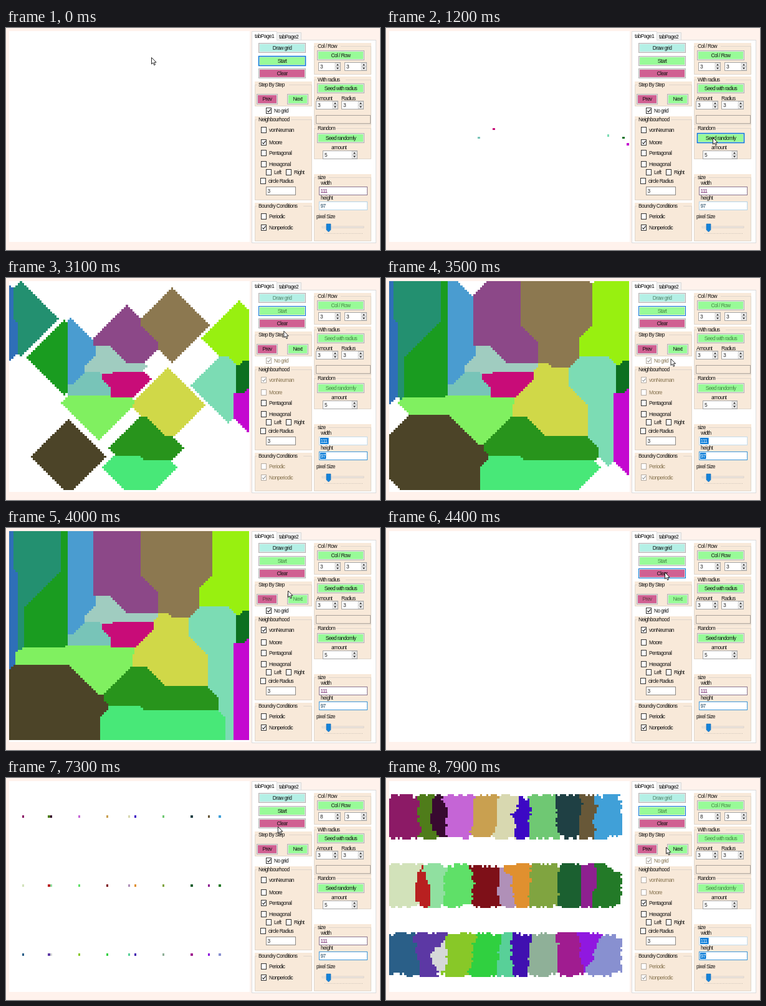
Recreate the animation shown at these times as an HTML page with a canvas. Size 600 px wide and 357 px high, loop 8 s.

```html
<!DOCTYPE html>
<html lang="en">
<head>
<meta charset="utf-8">
<title>Grain growth</title>
<style>
  html, body { margin: 0; width: 100%; height: 100%; overflow: hidden; background: #fff2ec; }
  canvas, svg { position: absolute; left: 0; top: 0; }
  text { font: 8.4px "Liberation Sans", Arial, sans-serif; letter-spacing: -.6px; white-space: pre; }
</style>
</head>
<body>
<canvas id="field" width="600" height="357"></canvas>
<svg id="ui" width="600" height="357" viewBox="0 0 600 357"></svg>
<script>
const LOOP = 8000, TICK = 100;
const COLS = 111, ROWS = 97, CELL = 3.465, ORIGIN = 5;
const ui = document.getElementById('ui');
const pen = document.getElementById('field').getContext('2d');

// --- Seeds -----------------------------------------------------------
const toCell = px => Math.round((px - ORIGIN) / CELL - .5);

const scattered = [
  [1100, 149, 177, '#78c4b8'], [1100, 173, 163, '#c80c78'], [1100, 356, 173, '#7cdcb4'],
  [1100, 380, 177, '#0c7020'], [1100, 388, 187, '#c408d0'],
  [1400, 24, 66, '#239070'], [1400, 7, 73, '#2f6fb8'], [1400, 94, 128, '#1a9c20'],
  [1400, 104, 125, '#4a9cd0'], [1400, 194, 104, '#8c4888'],
  [1700, 266, 76, '#8c7850'], [1700, 374, 97, '#98f010'], [1700, 166, 142, '#a0ccc0'],
  [1700, 149, 201, '#80f060'],
  [2000, 260, 204, '#d0d848'], [2000, 225, 273, '#28941c'], [2000, 100, 287, '#4c4428'],
  [2000, 214, 305, '#48e878']
].map(([time, x, y, color]) => ({ time, col: toCell(x), row: toCell(y), color }));

const palettes = [
  '8c1a66 4f7c1a 380a30 c565d6 c9a050 d8d8b0 3c08c4 6fc873 1f4044 685838 40a0d8',
  'd2e2ba b82020 90e0a0 5fe068 7e1018 b090b8 e0902f 80a440 1b6030 8e2090 237a28',
  '2a5f88 5c38a4 d5d8d8 88c828 30d040 58d098 4010b0 8fb098 a01c90 9018e0 8890d0'
];

// Evenly spaced seeds: one pass with three columns, one with eight.
const evenly = (count, time) => Array.from({ length: count }, (_, i) => {
  const gap = Math.floor(COLS / count);
  return { time, col: i * gap + (gap >> 1) };
});
const lined = palettes.flatMap((palette, band) => {
  const colors = palette.split(' ');
  return [...evenly(3, 5000), ...evenly(8, 6000)]
    .sort((a, b) => a.col - b.col)
    .map((seed, i) => ({ ...seed, row: 16 + 32 * band, color: '#' + colors[i] }));
});

// --- Cellular automaton ----------------------------------------------
let randomState = 7;
const random = () => (randomState = randomState * 16807 % 2147483647) / 2147483647;

const CROSS = [[0, -1], [-1, 0], [1, 0], [0, 1]];
const AROUND = [...CROSS, [-1, -1], [1, -1], [-1, 1], [1, 1]];
const PENTAGONS = CROSS.map(([sx, sy]) =>
  AROUND.filter(([dx, dy]) => sx ? dx !== sx : dy !== sy));
const vonNeuman = () => CROSS;
const pentagonal = () => PENTAGONS[Math.floor(random() * 4)];

function grow(grid, neighbours) {
  return grid.map((value, i) => {
    if (value >= 0) return value;
    const col = i % COLS, row = (i - col) / COLS, votes = {};
    let best = -1;
    for (const [dx, dy] of neighbours()) {
      const x = col + dx, y = row + dy;
      if (x < 0 || y < 0 || x >= COLS || y >= ROWS) continue;
      const grain = grid[y * COLS + x];
      if (grain < 0) continue;
      votes[grain] = (votes[grain] || 0) + 1;
      if (best < 0 || votes[grain] > votes[best]) best = grain;
    }
    return best;
  });
}

function growth(seeds, neighbours) {
  const first = new Array(COLS * ROWS).fill(-1);
  seeds.forEach((seed, i) => { first[seed.row * COLS + seed.col] = i; });
  const steps = [first];
  return n => {
    while (steps.length <= n) steps.push(grow(steps[steps.length - 1], neighbours));
    return steps[n];
  };
}
const scatteredGrowth = growth(scattered, vonNeuman);
const linedGrowth = growth(lined, pentagonal);

const edgeOf = index => Math.round(ORIGIN + index * CELL);

function paintCell(col, row, color) {
  const x = edgeOf(col), y = edgeOf(row);
  pen.fillStyle = color;
  pen.fillRect(x, y, edgeOf(col + 1) - x, edgeOf(row + 1) - y);
}

function drawField(t) {
  pen.fillStyle = '#fff2ec';
  pen.fillRect(0, 0, 600, 357);
  pen.fillStyle = '#fff';
  pen.fillRect(5, 5, 386, 339);
  if (t >= 4300 && t < 5000) return;

  const early = t < 4300;
  const seeds = early ? scattered : lined;
  const started = t >= (early ? 2800 : 7600);
  if (!started) {
    seeds.filter(s => t >= s.time).forEach(s => paintCell(s.col, s.row, s.color));
    return;
  }
  const step = early ? 2 + (t - 2800) / 20 : (t - 7600) / 30;
  const grid = (early ? scatteredGrowth : linedGrowth)(Math.min(60, Math.floor(step)));
  grid.forEach((grain, i) => {
    if (grain >= 0) paintCell(i % COLS, Math.floor(i / COLS), seeds[grain].color);
  });
}

// --- Widgets ---------------------------------------------------------
const BLUE = '#0078d7', SAND = '#f8e9d9', GREEN = '#98fb98', ROSE = '#d06092', AQUA = '#b4f0e6';

const rect = (x, y, w, h, fill, stroke = 'none', width = 1) =>
  `<rect x="${x}" y="${y}" width="${w}" height="${h}" fill="${fill}" stroke="${stroke}" stroke-width="${width}"/>`;
const path = (d, stroke, fill = 'none', width = 1) =>
  `<path d="${d}" fill="${fill}" stroke="${stroke}" stroke-width="${width}"/>`;
const label = (x, y, str, fill = '#111', anchor = 'start') =>
  `<text x="${x}" y="${y}" fill="${fill}" text-anchor="${anchor}">${str}</text>`;

function group(x, y, w, h, title) {
  const width = title.length * 3.9 + 3;
  return rect(x, y, w, h, SAND) +
    path(`M${x + 4} ${y + 5.5}H${x + .5}V${y + h - .5}H${x + w - .5}V${y + 5.5}H${x + 5 + width}`, '#dfd6cc') +
    label(x + 6, y + 8, title);
}

function button(x, y, w, h, str, fill, { off, focus, hover } = {}) {
  const edge = focus || hover ? BLUE : '#b4b4b4';
  return rect(x + .5, y + .5, w - 1, h - 1, '#e4e4e4', edge, focus ? 1.5 : 1) +
    rect(x + 2, y + 2, w - 4, h - 4, fill) +
    label(x + w / 2, y + h / 2 + 2.8, str, off ? 'rgba(0,40,0,.55)' : '#111', 'middle');
}

function check(x, y, str, on, off, gap = 13) {
  const ink = off ? '#b5aca2' : '#333';
  return rect(x + .5, y - 4.5, 8, 9, '#fff', ink) +
    (on ? path(`M${x + 2} ${y}l2 2.2l3.5 -4.6`, off ? '#999' : '#222', 'none', 1.1) : '') +
    label(x + gap, y + 3, str, off ? '#86734f' : '#111');
}

function spinner(x, y, w, value) {
  const b = x + w - 9;
  return rect(x + .5, y + .5, w - 1, 13, '#fff', '#a5a5a5') +
    label(x + 3, y + 9.8, value, '#222') +
    rect(b, y + 1.5, 8, 5, '#f0f0f0', '#c4c4c4', .7) +
    rect(b, y + 7.5, 8, 5, '#f0f0f0', '#c4c4c4', .7) +
    path(`M${b + 2} ${y + 5.2}l2 -2.4l2 2.4zM${b + 2} ${y + 8.8}l2 2.4l2 -2.4z`, 'none', '#222');
}

function input(x, y, w, value, ink, edge, selected) {
  return rect(x + .5, y + .5, w - 1, 13, '#fff', edge) +
    (selected ? rect(x + 2, y + 2, value.length * 4.2 + 1, 10, BLUE) : '') +
    label(x + 2.5, y + 9.8, value, selected ? '#fff' : ink);
}

function slider() {
  return rect(507, 319, 67, 2.5, '#eee6e0', '#d5ccc4', .7) +
    path('M514 315H521V324.5L517.5 328L514 324.5Z', '#1a6cb5', '#1683d8', .6) +
    `<path d="M511 330.5H572" stroke="#c9bfb5" stroke-dasharray="1 1.5"/>`;
}

// --- Pointer ---------------------------------------------------------
const route = [
  [0, 233, 47], [900, 524, 176], [2000, 524, 176], [2300, 413, 165], [2400, 413, 163],
  [2600, 425, 77], [2700, 438, 56], [2800, 438, 56], [3500, 456.5, 129.5], [3800, 457, 130],
  [4200, 447, 71], [4500, 447, 71], [4900, 535, 46], [5100, 535, 46], [5400, 531, 59],
  [5800, 531, 59], [5950, 531, 48], [6100, 531, 56], [6300, 531, 58], [6900, 413, 201],
  [7000, 413, 201], [7400, 440, 55], [7600, 440, 55], [7900, 449, 111]
];

function pointer(t) {
  const next = Math.max(1, route.findIndex(stop => stop[0] >= t));
  const [t0, x0, y0] = route[next - 1], [t1, x1, y1] = route[next];
  const u = (t - t0) / (t1 - t0), ease = u * u * (3 - 2 * u);
  const x = x0 + (x1 - x0) * ease, y = y0 + (y1 - y0) * ease;
  return `<g transform="translate(${x.toFixed(1)} ${y.toFixed(1)})">` +
    path('M.5 .5V11L3 8.8L4.7 12.8L6.4 12L4.8 8.2H8Z', '#111', '#fff', .9) + '</g>';
}

// --- Window ----------------------------------------------------------
function focusAt(t) {
  if (t < 1000) return 'start';
  if (t < 2300) return 'random';
  if (t >= 2700 && t < 2800) return 'start';
  if (t >= 5000 && t < 5400 || t >= 5900 && t < 6900) return 'colrow';
  return '';
}

function drawWindow(t) {
  const running = t >= 2800 && t < 3900 || t >= 7600;
  const halted = t >= 3900 && t < 5000;
  const focus = focusAt(t);
  const hood = t < 2300 ? 'moore' : t < 6900 ? 'neuman' : 'penta';
  const columns = Math.max(3, Math.min(8, 3 + Math.floor((t - 5300) / 100)));
  const clearHot = t >= 2600 && t < 2700 || t >= 4200 && t < 4600;
  const widthEdge = running ? '#c4dcec' : '#8d7690';
  const heightEdge = t < 2800 ? '#b5d5ea' : '#3c96d8';

  ui.innerHTML = [
    rect(394.5, 19.5, 199, 326, '#fff', '#dcdcdc'),
    rect(434.5, 7.5, 39, 12, '#f2f2f2', '#dadada'),
    path('M394.5 20V5.5H434.5V20', '#dcdcdc', '#fff'),
    label(399, 15.5, 'tabPage1'), label(438, 16.5, 'tabPage2'),

    button(405, 24, 76, 16, 'Draw grid', AQUA, { off: running }),
    button(405, 45, 76, 16, 'Start', GREEN,
      { off: running || halted, focus: focus === 'start', hover: running }),
    button(405, 65, 76, 16, 'Clear', ROSE, { hover: clearHot }),

    group(399, 86, 92, 40, 'Step By Step'),
    button(402, 106, 34, 17, 'Prev', ROSE, { off: halted }),
    button(451, 106, 34, 17, 'Next', GREEN, { off: halted }),
    check(417, 133, 'No grid', true, running),

    group(399, 142, 92, 135, 'Neighbourhood'),
    check(409, 164, 'vonNeuman', hood === 'neuman', running),
    check(409, 184, 'Moore', hood === 'moore', running),
    check(409, 201, 'Pentagonal', hood === 'penta'),
    check(409, 219, 'Hexagonal'),
    check(417, 232, 'Left'), check(449, 232, 'Right'),
    check(408, 246, 'circle Radius'),
    input(417, 255, 48, '3', '#222', '#8f8a85'),

    group(399, 281, 92, 62, 'Boundry Conditions'),
    check(409, 303, 'Periodic', false, running),
    check(409, 321, 'Nonperiodic', true, running),

    group(494, 24, 92, 51, 'Col / Row'),
    button(499, 36, 76, 16, 'Col / Row', GREEN, { off: running, focus: focus === 'colrow' }),
    spinner(501, 55, 36, columns), spinner(543, 55, 36, 3),

    group(494, 78, 92, 78, 'With radius'),
    button(499, 89, 76, 16, 'Seed with radius', GREEN, { off: running }),
    label(498, 116, 'Amount'), label(538, 116, 'Radius'),
    spinner(497, 117, 36, 3), spinner(538, 117, 36, 3),
    rect(497.5, 140.5, 87, 13, SAND, '#a9a29b'),

    group(494, 156, 92, 55, 'Random'),
    button(499, 169, 76, 16, 'Seed randomly', GREEN, { off: running, focus: focus === 'random' }),
    label(522, 195, 'amount'),
    spinner(508, 197, 56, 5),

    group(494, 235, 92, 108, 'size'),
    label(505, 252, 'width'),
    input(502, 255, 78, '111', '#6a1560', widthEdge, running),
    label(505, 276, 'height'),
    input(502, 279, 78, '97', '#123c58', heightEdge, running),
    label(498, 306, 'pixel Size'),
    slider(),
    pointer(t)
  ].join('');
}

let shown = -1;
function render(now) {
  const t = Math.floor(now % LOOP / TICK) * TICK;
  if (t !== shown) {
    shown = t;
    drawField(t);
    drawWindow(t);
  }
}

const began = performance.now();
function loop() {
  render(performance.now() - began);
  requestAnimationFrame(loop);
}
loop();
</script>
</body>
</html>
```
